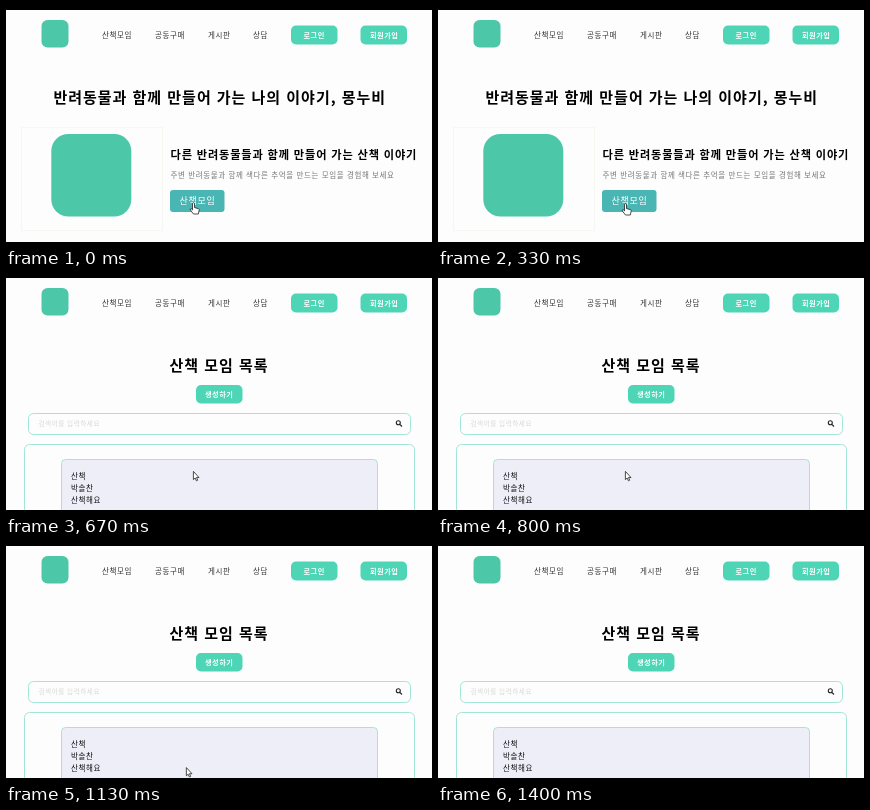
Write an HTML page that moves like this. It is 426 px wide and 240 px high and loops after 1470 ms.

```html
<!DOCTYPE html>
<html lang="ko">
<head>
<meta charset="utf-8">
<title>산책 모임</title>
<style>
  html, body { margin: 0; width: 100%; height: 100%; overflow: hidden; background: #fdfdfd; }
  svg { display: block; width: 426px; height: 240px; }
  text { font: 7.5px "Noto Sans CJK KR", "Noto Sans CJK", "Noto Sans CJK JP", sans-serif; letter-spacing: .6px; fill: #333; }
  .title { font-size: 15px; font-weight: 700; letter-spacing: .98px; fill: #000; }
  .subtitle { font-size: 11.2px; font-weight: 700; letter-spacing: .85px; fill: #000; }
  .note { fill: #777; }
  .label { font-size: 7.2px; font-weight: 700; letter-spacing: .5px; fill: #fff; }
  .big { font-size: 9px; font-weight: 500; letter-spacing: .7px; }
  .hint { font-size: 6.6px; letter-spacing: .5px; fill: #d6d9d6; }
  .item { font-weight: 500; fill: #111; }
  .mint { fill: #4dd5b6; }
  .logo { fill: #4cc8a8; }
  .frame { fill: #fdfdfd; stroke: #a2e6d6; }
</style>
</head>
<body>
<svg viewBox="0 0 426 240">
  <rect width="426" height="240" fill="#fdfdfd"/>

  <rect class="logo" x="35.5" y="14" width="27" height="27.5" rx="6"/>
  <text x="96" y="32">산책모임</text>
  <text x="149" y="32">공동구매</text>
  <text x="202" y="32">게시판</text>
  <text x="247" y="32">상담</text>
  <rect class="mint" x="285" y="19.5" width="46.5" height="19" rx="5"/>
  <text class="label" x="297.5" y="32">로그인</text>
  <rect class="mint" x="354.5" y="19.5" width="46.5" height="19" rx="5"/>
  <text class="label" x="364" y="32">회원가입</text>

  <g id="home">
    <text class="title" x="47.5" y="97">반려동물과 함께 만들어 가는 나의 이야기, 몽누비</text>
    <rect x="15.5" y="121.5" width="141" height="103" fill="none" stroke="#f6f7f0"/>
    <rect class="logo" x="45.3" y="128" width="80" height="82.5" rx="17"/>
    <text class="subtitle" x="164.5" y="153">다른 반려동물들과 함께 만들어 가는 산책 이야기</text>
    <text class="note" x="164.5" y="172">주변 반려동물과 함께 색다른 추억을 만드는 모임을 경험해 보세요</text>
    <rect x="164" y="184" width="54.5" height="22" rx="3" fill="#4ab6b4"/>
    <text class="label big" x="173.5" y="198.4">산책모임</text>
    <path id="hand" fill="#fff" stroke="#222" stroke-width=".8" stroke-linejoin="round"
      d="M-1 1Q0-.6 1 1V5L5 6.2Q6 6.6 5.6 8L4.8 11.5H0L-3.2 7.4Q-3.4 6-2.2 6.3L-1 7.4Z"/>
  </g>

  <g id="list">
    <text class="title" x="163.5" y="97">산책 모임 목록</text>
    <rect class="mint" x="190" y="111" width="46.5" height="18.5" rx="5"/>
    <text class="label" x="199" y="123">생성하기</text>
    <rect class="frame" x="22.5" y="139.5" width="382" height="21" rx="5"/>
    <text class="hint" x="32.5" y="152.3">검색어를 입력하세요</text>
    <g fill="none" stroke="#222" stroke-width="1.1">
      <circle cx="392.3" cy="148.8" r="2"/>
      <path d="M393.8 150.3L396 152.5"/>
    </g>
    <rect class="frame" x="18.5" y="170.5" width="390" height="90" rx="5"/>
    <rect class="frame" x="55.5" y="185.5" width="316" height="70" rx="4" style="fill:#eeeef9"/>
    <text class="item" x="65" y="204.8">산책</text>
    <text class="item" x="65" y="217">박솔찬</text>
    <text class="item" x="65" y="229.2">산책해요</text>
    <path id="arrow" fill="#fff" stroke="#222" stroke-width=".8" stroke-linejoin="round"
      d="M.4.4V8.6L2.2 7L3.4 9.8L4.7 9.2L3.5 6.5H6Z"/>
  </g>

  <path d="M0 0H426V4H0ZM0 236H426V240H0Z"/>
</svg>
<script>
  const LOOP = 1470, SWITCH = 470;
  const $ = id => document.getElementById(id);
  const handPath = [[0, 187.5, 196.5], [330, 187.5, 197.5], [SWITCH, 187.5, 197.5]];
  const arrowPath = [[SWITCH, 187, 197], [800, 187, 197], [930, 187, 199.5],
    [1000, 186, 205], [1130, 180, 225], [1210, 177, 240]];

  function place(el, path, t) {
    const next = path.findIndex(p => p[0] > t);
    const b = path.at(next), a = next > 0 ? path[next - 1] : b;
    const k = a === b ? 0 : (t - a[0]) / (b[0] - a[0]);
    const [x, y] = [1, 2].map(i => a[i] + (b[i] - a[i]) * k);
    el.setAttribute("transform", `translate(${x} ${y})`);
  }

  function draw() {
    const t = performance.now() % LOOP;
    const onList = t >= SWITCH;
    $("home").style.display = onList ? "none" : "";
    $("list").style.display = onList ? "" : "none";
    if (onList) place($("arrow"), arrowPath, t);
    else place($("hand"), handPath, t);
    requestAnimationFrame(draw);
  }
  draw();
</script>
</body>
</html>
```
